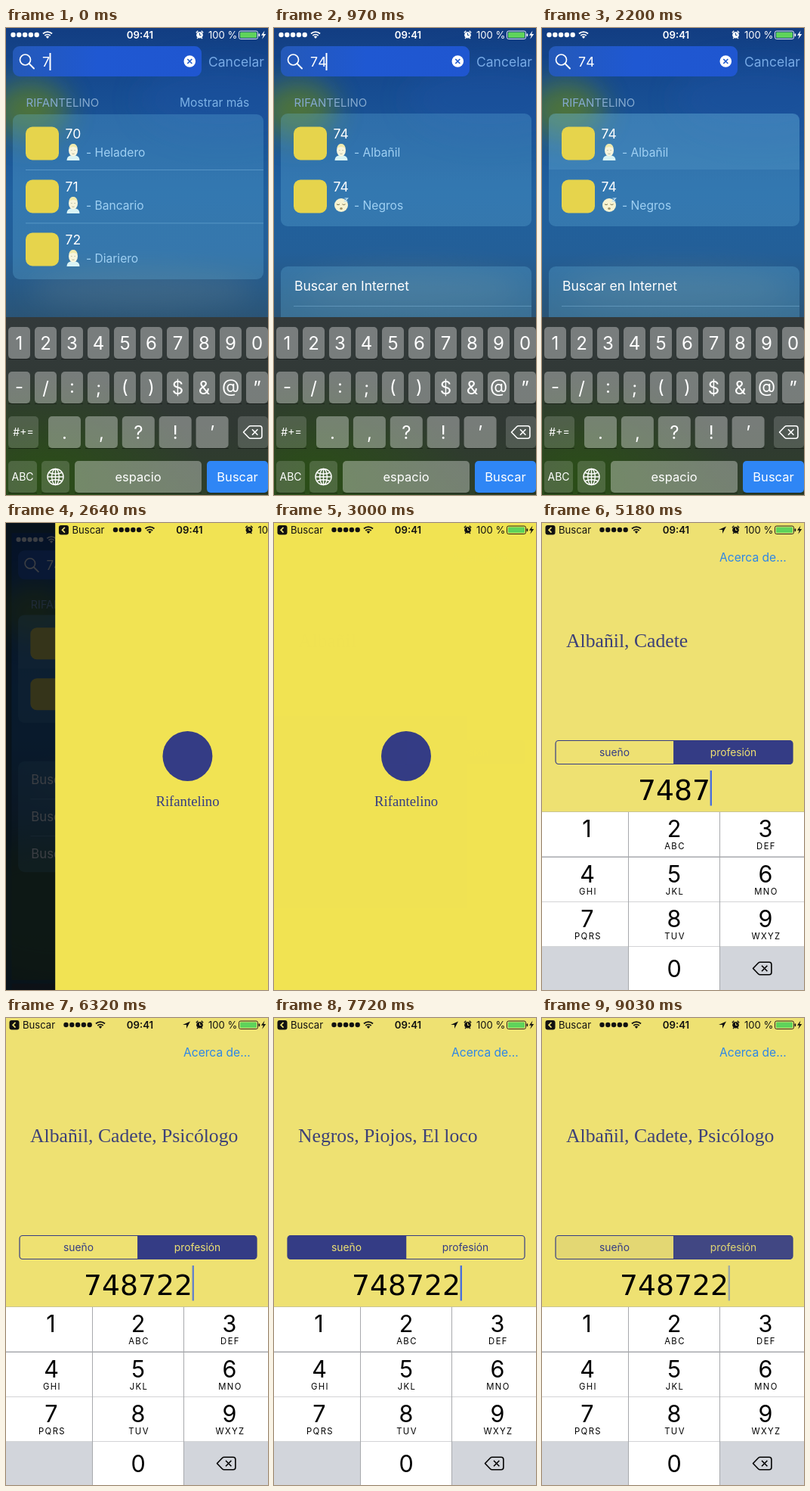
Animation of 347x617 px, one loop 9660 ms. Source, as an HTML page:

```html
<!DOCTYPE html>
<html lang="es">
<head>
<meta charset="utf-8">
<title>Rifantelino</title>
<style>
html, body { margin: 0; width: 100%; height: 100%; overflow: hidden; background: #eee172; }
svg { display: block; width: 347px; height: 617px; }
text { font-family: Inter, sans-serif; white-space: pre; }
.serif { font-family: "Liberation Serif", serif; }
.entry { font-family: "DejaVu Sans", sans-serif; }
.mid { text-anchor: middle; }
#board1 { font-feature-settings: "case"; }
</style>
</head>
<body>
<svg id="stage" viewBox="0 0 347 617"></svg>
<script>
const LOOP = 9660;
const NAVY = '#343c85', YELLOW = '#eee172', SPLASH = '#f1e353';
const $ = id => document.getElementById(id);

// Drawing helpers
const rect = (x, y, w, h, fill, r = 0, more = '') =>
  `<rect x="${x}" y="${y}" width="${w}" height="${h}" rx="${r}" fill="${fill}" ${more}/>`;
const text = (x, y, size, fill, str, more = '') =>
  `<text x="${x}" y="${y}" font-size="${size}" fill="${fill}" ${more}>${str}</text>`;
const mid = (x, y, size, fill, str, more = '') =>
  text(x, y, size, fill, str, `class="mid" ${more}`);
const line = (d, stroke, w = 1.5, more = '') =>
  `<path d="${d}" fill="none" stroke="${stroke}" stroke-width="${w}" ${more}/>`;
const glow = (x, y, rx, ry, fill, opacity) =>
  `<ellipse cx="${x}" cy="${y}" rx="${rx}" ry="${ry}" fill="${fill}" opacity="${opacity}" filter="url(#soft)"/>`;
const group = (id, body, more = '') => `<g id="${id}" ${more}>${body}</g>`;

function statusBar(ink, inApp) {
  const dx = inApp ? 70 : 0;
  let s = '';
  for (let i = 0; i < 5; i++) s += `<circle cx="${9.5 + dx + i * 7.8}" cy="9" r="3.2" fill="${ink}"/>`;
  s += `<g transform="translate(${55 + dx} 13)">` +
    line('M-6 -5.5a8.6 8.6 0 0 1 12 0M-3.7 -3a5.4 5.4 0 0 1 7.4 0', ink, 1.8) +
    `<path d="M0 1l-2.2 -2.5a3.2 3.2 0 0 1 4.4 0z" fill="${ink}"/></g>`;
  if (inApp) {
    s += rect(4.5, 3, 13, 12.5, '#111', 3) + line('M12.5 5.8l-3.4 3.4 3.4 3.4', YELLOW, 1.7) +
      text(22, 14, 13.1, ink, 'Buscar') +
      `<path id="arrow" d="M244 4.5l-10 4.6h5v5z" fill="${ink}"/>`;
  }
  s += mid(177.5, 14, 13.2, ink, '09:41', 'font-weight="600"');
  s += `<circle cx="256.5" cy="9.3" r="4.3" fill="${ink}"/>` +
    line('M251.8 6.2l2.5 -2.4M261.2 6.2l-2.5 -2.4M253 14l1.5 -1.5M260 14l-1.5 -1.5', ink, 1.3) +
    line('M256.5 6.5v3h2', inApp ? YELLOW : '#174a8c', 1);
  s += text(268, 14, 13.1, ink, '100 %');
  s += rect(308.5, 4, 25, 10.5, 'none', 2.2, `stroke="${ink}" stroke-width=".9"`) +
    rect(310, 5.5, 22, 7.5, '#5fd35b', 1) + rect(334.6, 7.3, 1.6, 4, ink, 1) +
    `<path d="M342.5 3.5l-4.5 6.2h2.8l-1.6 5 5 -6.6h-3z" fill="${ink}"/>`;
  return s;
}

const backspace = (x, y, ink) => `<g transform="translate(${x} ${y})">` +
  line('M-12.5 0l7 -7.3q1 -1 2.4 -1h12q3 0 3 3v10.6q0 3 -3 3h-12q-1.4 0 -2.4 -1z', ink, 1.6, 'stroke-linejoin="round"') +
  line('M-1 -3.8l7.4 7.6M6.4 -3.8l-7.4 7.6', ink, 1.6) + '</g>';

// Search screen
const person = y => `<g transform="translate(89 ${y})">` +
  '<path d="M-8.5 11q0 -7 8.5 -7t8.5 7z" fill="#d9f3f5"/>' +
  '<ellipse cy="-2.5" rx="6" ry="8" fill="#f8f5dc"/>' +
  '<path d="M-5.6 -5.4q1 -5.6 5.6 -5.6t5.6 5.6q-5.6 -3 -11.2 0z" fill="#efe9ad"/>' +
  line('M-2.8 -2.4h1.4M1.4 -2.4h1.4M-1.6 2q1.6 .8 3.2 0', '#a5a790', .8) + '</g>';
const sleeper = y => `<g transform="translate(89 ${y})"><circle r="9" fill="#f7f3d2"/>` +
  line('M-6 -1.2q2 1.6 4 0M1.5 -1.2q2 1.6 4 0', '#77704a', 1) +
  '<ellipse cy="4.4" rx="1.8" ry="1.5" fill="#a09468"/>' +
  line('M4.5 -9h4l-4 4h4', '#bfe2f4', 1.2) + '</g>';
function result(y, num, job, face = person) {
  return rect(26, y + 16.5, 44, 44, '#e6d44c', 9) +
    text(78.5, y + 31.5, 17.5, '#fff', num) + face(y + 50) +
    text(106, y + 56, 15.6, '#9fd0f3', '- ' + job);
}
const GLASS = 'rgba(105,185,225,.27)';
const rule = y => rect(26, y, 315, .8, 'rgba(150,205,240,.45)');

const wallpaper = rect(0, 0, 347, 617, 'url(#sky)') +
  glow(32, 108, 50, 38, '#5f7f1e', .75) +
  glow(285, 95, 110, 50, '#1a52a6', .4) +
  glow(180, 345, 150, 26, '#6f8790', .3) +
  glow(60, 520, 140, 90, '#3c6030', .6);

const searchBar = rect(9, 24, 250, 40, 'url(#field)', 9) +
  '<circle cx="25.5" cy="42" r="7" fill="none" stroke="#fff" stroke-width="1.7"/>' +
  line('M30.5 47l6.5 6.5', '#fff', 1.9, 'stroke-linecap="round"') +
  text(48, 50.5, 17.8, '#fff', '7') + text(58.2, 50.5, 17.8, '#fff', '4', 'id="four"') +
  rect(0, 33, 2, 23, '#fff', 0, 'id="caret"') +
  '<circle cx="243.3" cy="44" r="7.8" fill="#fff"/>' +
  line('M240.3 41l6 6M246.3 41l-6 6', '#1f59cd', 1.7) +
  text(268, 50.5, 17.5, '#78aae6', 'Cancelar') +
  text(26.5, 104, 15, '#84a9cf', 'RIFANTELINO');

const wide = rect(9, 114, 332, 218, GLASS, 9) +
  text(230, 104, 15.6, '#7db2e6', 'Mostrar más') +
  result(114, '70', 'Heladero') + rule(187) +
  result(184, '71', 'Bancario') + rule(257.5) + result(254, '72', 'Diariero');

const narrow = rect(9, 113, 332, 149, GLASS, 9) +
  '<path id="touch" d="M9 187v-65q0 -9 9 -9h314q9 0 9 9v65z" fill="rgba(130,200,235,.15)"/>' +
  result(114, '74', 'Albañil') + result(184, '74', 'Negros', sleeper) +
  rect(9, 315, 332, 153, GLASS, 9) +
  ['Internet', 'la tienda', 'mapas'].map((s, i) =>
    text(27, 347 + i * 51, 17.5, '#fff', 'Buscar en ' + s) + (i ? rule(316 + i * 51) : '')).join('');

function keyboard() {
  const LIGHT = 'rgba(255,255,255,.34)', DARK = 'rgba(255,255,255,.16)';
  const key = (x, y, w, label, fill = LIGHT, size = 24) =>
    rect(x, y + 42, w, 1, 'rgba(0,0,0,.4)') + rect(x, y, w, 42, fill, 5) +
    mid(x + w / 2, y + 21 + size * .36, size, '#fff', label);
  let s = rect(0, 382, 347, 235, 'url(#board)') + rect(0, 382, 347, 235, 'url(#grass)');
  [...'1234567890'].forEach((c, i) => s += key(3 + i * 35, 395, 29, c));
  [...'-/:;()$&@”'].forEach((c, i) => s += key(3 + i * 35, 454, 29, c === '&' ? '&amp;' : c));
  [...'.,?!’'].forEach((c, i) => s += key(56 + i * 48.9, 513, 43, c));
  s += key(3, 513, 40, '#+=', DARK, 14) + key(307, 513, 40, '', DARK) + backspace(327, 534, '#fff');
  s += key(3, 572, 38, 'ABC', DARK, 14) + key(47, 572, 37, '', DARK) +
    key(91, 572, 168, 'espacio', LIGHT, 16.5) + key(266, 572, 81, 'Buscar', '#2f86f5', 16.5);
  s += '<g transform="translate(65.5 593)" fill="none" stroke="#fff" stroke-width="1.4">' +
    '<circle r="10.5"/><ellipse rx="4.8" ry="10.5"/>' +
    '<path d="M-10.5 0h21M0 -10.5v21M-8.5 -5.5q8.5 3.4 17 0M-8.5 5.5q8.5 -3.4 17 0"/></g>';
  return s + rect(108, 395, 29, 42, '#fff', 5, 'id="tap4"');
}

// Number screen
function numberPad() {
  const left = [0, 115, 236], width = [114, 120, 111], centre = [60, 175, 296];
  const top = [382, 442, 501, 560], letters = ['', 'ABC', 'DEF', 'GHI', 'JKL', 'MNO', 'PQRS', 'TUV', 'WXYZ'];
  let s = rect(0, 381.5, 347, 236, '#a7a9ad');
  top.forEach((y, r) => left.forEach((x, c) => {
    const n = r * 3 + c + 1, side = r === 3 && c !== 1, h = r === 3 ? 57 : 58.5;
    s += rect(x, y, width[c], h, side ? '#d2d5db' : '#fff', 0, `id="pad${n}"`);
    if (side) return;
    const label = r === 3 ? 0 : n;
    s += mid(centre[c] - (n === 1 ? .5 : 0), y + (r === 3 ? 40 : 33), 30.5, '#000', label);
    if (r < 3) s += mid(centre[c] + 1, y + 49, 11.3, '#000', letters[n - 1], 'letter-spacing="1.4"');
  }));
  return s + backspace(292, 588.5, '#000');
}

const leftHalf = 'M175 287.5h-153q-4 0 -4 4v23q0 4 4 4h153z';
const rightHalf = 'M174.5 287.5h153.5q4 0 4 4v23q0 4 -4 4h-153.5z';
const segments = `<path id="touchL" d="${leftHalf}" fill="${NAVY}"/>` +
  `<path id="touchR" d="${rightHalf}" fill="${NAVY}"/>` +
  mid(96, 308, 13.8, NAVY, 'sueño') + mid(253.5, 308, 13.8, NAVY, 'profesión') +
  group('segL', `<path d="${leftHalf}" fill="${NAVY}"/>` + mid(96, 308, 13.8, YELLOW, 'sueño')) +
  group('segR', `<path d="${rightHalf}" fill="${NAVY}"/>` + mid(253.5, 308, 13.8, YELLOW, 'profesión')) +
  rect(18, 287.5, 314, 31, 'none', 4, `stroke="${NAVY}" stroke-width="1.2"`) +
  line('M174.7 287.5v31', NAVY, 1.1);

const app = rect(0, 0, 347, 617, YELLOW) +
  text(235, 51, 15.6, '#2e87e6', 'Acerca de...') +
  text(32, 163.5, 25.7, '#3d4178', '', 'class="serif" id="answer"') + segments +
  text(175, 365.5, 37.7, '#000', '', 'class="entry mid" id="entry"') +
  rect(0, 327, 2.4, 46.5, '#4a6fdc', 0, 'id="bar"') + group('pad', numberPad()) +
  group('splash', rect(0, 0, 347, 617, SPLASH) +
    `<circle cx="175" cy="308" r="33" fill="${NAVY}"/>` +
    text(133, 374, 18.7, NAVY, 'Rifantelino', 'class="serif"')) +
  statusBar('#111', true);

$('stage').innerHTML = `<defs>
  <linearGradient id="sky" x2="0" y2="1">
    <stop offset="0" stop-color="#123d82"/><stop offset=".14" stop-color="#174d92"/>
    <stop offset=".35" stop-color="#20609e"/><stop offset=".48" stop-color="#235f98"/>
    <stop offset=".62" stop-color="#2a5476"/><stop offset=".75" stop-color="#274a3c"/>
    <stop offset="1" stop-color="#2f4a30"/></linearGradient>
  <linearGradient id="field">
    <stop offset="0" stop-color="#2459b8"/><stop offset=".45" stop-color="#1f58d2"/>
    <stop offset="1" stop-color="#1f56d0"/></linearGradient>
  <linearGradient id="board" x2="0" y2="1">
    <stop offset="0" stop-color="#333a3b"/><stop offset=".6" stop-color="#303833"/>
    <stop offset="1" stop-color="#2e4029"/></linearGradient>
  <radialGradient id="grass" cx=".15" cy=".9" r=".6">
    <stop offset="0" stop-color="#2a5212" stop-opacity=".8"/>
    <stop offset="1" stop-color="#2a5212" stop-opacity="0"/></radialGradient>
  <filter id="soft" x="-50%" y="-100%" width="200%" height="300%"><feGaussianBlur stdDeviation="18"/></filter>
  </defs>` + rect(0, 0, 347, 617, '#1d4152') +
  group('search', wallpaper + searchBar + group('wide', wide) + group('narrow', narrow) +
    group('board1', keyboard()) + statusBar('#fff', false)) +
  rect(0, 0, 347, 617, '#02060c', 0, 'id="dim"') + group('app', app);

// Timeline: [ms, value] points, linear between them
const between = (a, b) => [[a, 0], [a, 1], [b, 1], [b, 0]];
const fades = {
  four: between(400, LOOP),
  tap4: [[300, 0], [300, .4], [400, .4], [460, 0]],
  wide: [[480, 1], [640, 0]],
  narrow: [[480, 0], [640, 1]],
  touch: between(2120, 2900),
  splash: [[3000, 1], [3220, 0]],
  arrow: between(3930, LOOP),
  touchL: [[6950, 0], [7040, .25], [7140, .25], [7240, 0], [8850, 0], [8850, .06]],
  touchR: [[8720, 0], [8790, .25], [8850, .25], [8950, 0]],
  segL: [[7140, 0], [7300, 1], [8850, 1], [9030, 0]],
  segR: [[7140, 1], [7300, 0], [8850, 0], [9030, .93]]
};
const entries = [[0, '74'], [4760, '748'], [5010, '7487'], [5760, '74872'], [6010, '748722']];
const answers = [[0, 'Albañil'], [5010, 'Albañil, Cadete'], [6010, 'Albañil, Cadete, Psicólogo'],
  [7140, 'Negros, Piojos, El loco'], [8850, 'Albañil, Cadete, Psicólogo']];
const presses = [[4700, 8], [4950, 7], [5700, 2], [5950, 2]];

function at(points, t) {
  const i = points.findIndex(p => p[0] > t);
  if (i < 0) return points[points.length - 1][1];
  if (!i) return points[0][1];
  const [a, x] = points[i - 1], [b, y] = points[i];
  return x + (y - x) * (t - a) / (b - a);
}
const latest = (steps, t) => steps.filter(s => s[0] <= t).pop()[1];
const easeOut = (t, a, b, pow) => 1 - Math.pow(1 - Math.min(1, Math.max(0, (t - a) / (b - a))), pow);
const set = (id, name, v) => $(id).setAttribute(name, v);

// Blink cycle beginning with a fade-out at `start`
const blink = (t, start) => t < start ? 1 :
  at([[0, 1], [290, 0], [460, 0], [570, 1], [870, 1]], (t - start) % 870);

function draw(t) {
  for (const id in fades) set(id, 'opacity', at(fades[id], t));

  set('caret', 'x', t < 400 ? 57.5 : 68.5);
  set('caret', 'opacity', blink(t, 1000));
  set('board1', 'transform', `translate(0 ${240 * easeOut(t, 2240, 2600, 2)})`);

  const open = easeOut(t, 2380, 2910, 2.46), scale = 1 - .053 * open;
  set('search', 'transform', `translate(173.5 308.5) scale(${scale}) translate(-173.5 -308.5)`);
  set('dim', 'opacity', .95 * open);
  set('app', 'transform', `translate(${347 * (1 - open)} 0)`);
  set('pad', 'transform', `translate(0 ${236 * (1 - easeOut(t, 3000, 3380, 2.5))})`);

  const digits = latest(entries, t);
  $('entry').textContent = digits;
  $('answer').textContent = latest(answers, t);
  set('bar', 'x', 174.6 + digits.length * 12);
  set('bar', 'opacity', t < 4700 ? blink(t, 3340) : blink(t, 6270));

  for (const [, n] of presses) set('pad' + n, 'fill', '#fff');
  for (const [start, n] of presses)
    if (t >= start && t < start + 130) set('pad' + n, 'fill', '#d2d5db');
}

const begin = performance.now();
function tick() {
  draw((performance.now() - begin) % LOOP);
  requestAnimationFrame(tick);
}
tick();
</script>
</body>
</html>
```
